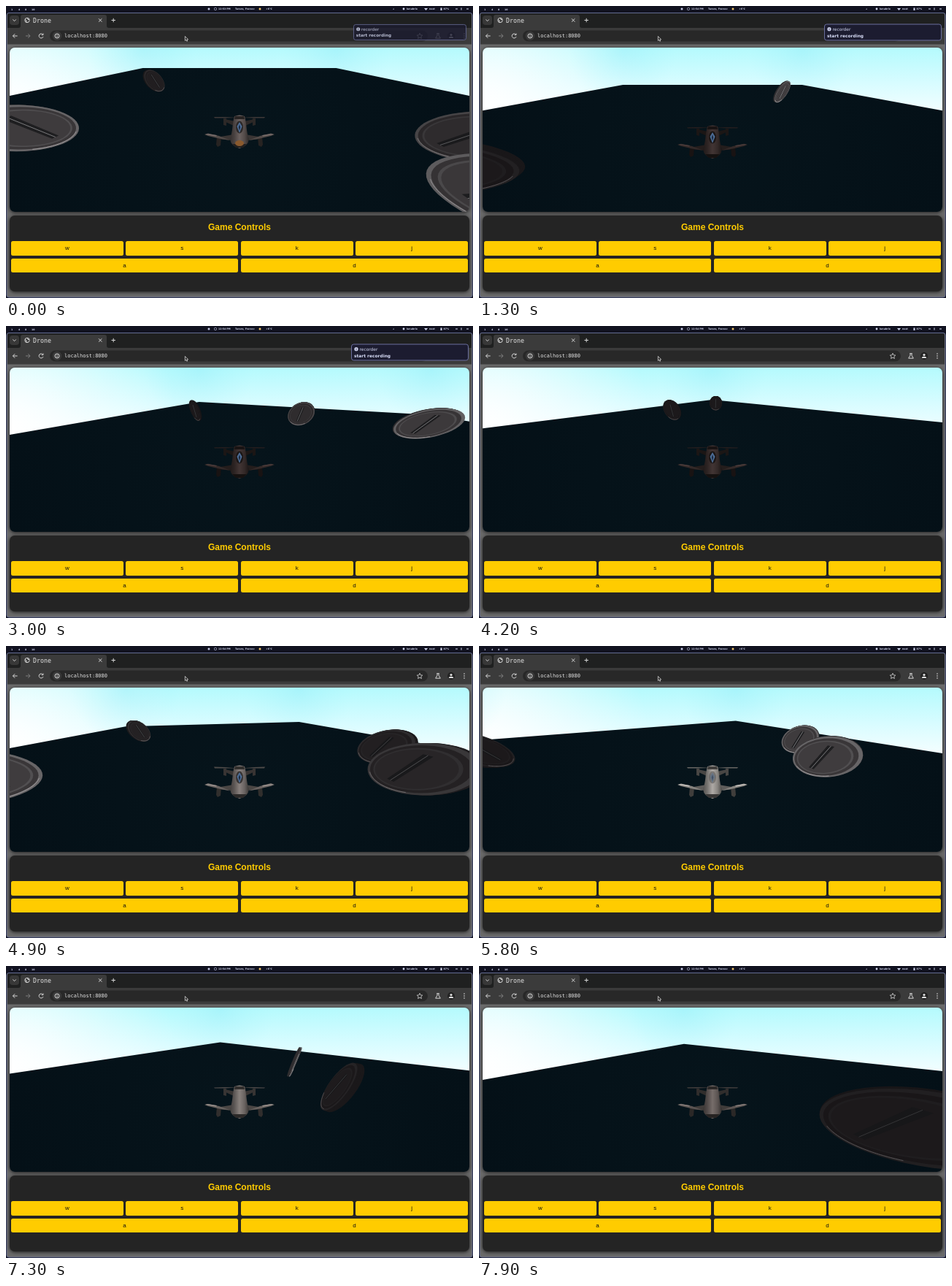
An HTML page with a canvas for the animation above (8000 ms loop, 640 by 400 pixels).

```html
<!DOCTYPE html>
<html lang="en">
<head>
<meta charset="utf-8">
<title>Drone</title>
<style>
  html, body { margin: 0; width: 100%; height: 100%; overflow: hidden; background: #111220; }
  #stage { position: absolute; left: 0; top: 0; width: 640px; height: 400px; overflow: hidden; }
  svg { position: absolute; left: 0; top: 0; }
  canvas, .panel { position: absolute; left: 5px; width: 630px; border-radius: 7px; box-shadow: 0 1px 5px #000b; }
  canvas { top: 57px; height: 225px; }
  .panel { top: 287px; height: 103.5px; background: #242424; }
  h1 { margin: 0; position: absolute; left: 0; right: 0; top: 9px; text-align: center; color: #fc0; font: bold 12px/15px "Liberation Sans", Arial, sans-serif; }
  .keys { position: absolute; left: 2px; right: 2px; top: 35.3px; display: grid; grid-template-columns: repeat(4, 1fr); gap: 3.9px; }
  .keys span { border-radius: 2.5px; background: #fc0; color: #111; text-align: center; font: 8px/19.5px "Liberation Sans", Arial, sans-serif; }
  .keys .wide { grid-column: span 2; }
  .mono { font-family: "DejaVu Sans Mono", monospace; fill: #e4e4e4; }
  .bar text { font: bold 3.2px "DejaVu Sans", sans-serif; fill: #d5daf2; }
  .line { fill: none; stroke: #d6d6d6; stroke-width: 1; }
  .note text { font: 5.9px "DejaVu Sans", sans-serif; fill: #d3d8f2; }
</style>
</head>
<body>
<div id="stage">
  <svg width="640" height="400" viewBox="0 0 640 400">
    <rect width="640" height="400" fill="#111220"/>
    <g class="bar">
      <text x="7" y="5.5">1</text><text x="17" y="5.5">4</text><text x="26" y="5.5">8</text><text x="35" y="5.5">10</text>
      <circle cx="278" cy="4" r="1.5" fill="#c5cae5"/>
      <circle cx="287" cy="4" r="1.7" fill="none" stroke="#c5cae5" stroke-width=".6"/>
      <text x="291" y="5.3" id="clock">12:53 PM</text>
      <text x="314" y="5.3">Tarare, France:</text>
      <circle cx="348" cy="4" r="1.5" fill="#efc46a"/>
      <text x="356" y="5.3">+6°C</text>
      <text x="530" y="5.3">◂</text><circle cx="545" cy="4" r="1.4" fill="#d5daf2"/>
      <text x="549" y="5.3">lunabrio</text>
      <path d="M573 3h5l-2.5 3z" fill="#d5daf2"/><text x="580" y="5.3">nest</text>
      <rect x="595.5" y="2.5" width="2" height="3.5" fill="#d5daf2"/><text x="599.5" y="5.3">87%</text>
      <path d="M616 4h3M624 2.5v3M631 4h3" stroke="#d5daf2"/>
    </g>
    <rect x="1" y="9.5" width="638" height="389.5" rx="3" fill="#6b6b6b" stroke="#626b91"/>
    <path d="M2 30V12q0-2 2-2h632q2 0 2 2v18z" fill="#1f2020"/>
    <rect x="2" y="30" width="636" height="22.5" fill="#3b3b3b"/>
    <path d="M17 30q3 0 3-3V15q0-3 3-3h112q3 0 3 3v12q0 3 3 3z" fill="#3b3b3b"/>
    <rect x="5" y="13" width="13" height="13" rx="4" fill="#383838"/>
    <g class="line">
      <path d="M9.3 18.5l2.2 2.2 2.2-2.2"/>
      <circle cx="29" cy="19.5" r="3.2"/><path d="M26 18.5l2 1.5v2.5M29.5 16.5l.5 2h2"/>
      <path d="M127 17.3l4.4 4.4M131.4 17.3l-4.4 4.4M144.5 19.5h5.4M147.2 16.8v5.4"/>
      <path d="M15.6 41H9.5M12.2 38.2L9.4 41l2.8 2.8"/>
      <path d="M27 41h6M30.3 38.2l2.8 2.8-2.8 2.8" stroke="#7d7d7d"/>
      <path d="M50.6 39.2A3 3 0 1 0 51 42M51 37.6v2h-2.2"/>
    </g>
    <rect x="60" y="33.5" width="518" height="15" rx="7.5" fill="#282828"/>
    <circle cx="70" cy="41" r="6.2" fill="#3a3a3a"/>
    <g class="line">
      <circle cx="70" cy="41" r="3"/><path d="M70 40.5v2.2M70 39v.7"/>
      <path d="M567 37.3l1.1 2.5 2.7.3-2 1.8.6 2.7-2.4-1.4-2.4 1.4.6-2.7-2-1.8 2.7-.3z" stroke-width=".8"/>
      <path d="M590.2 37.7h3.6M591 37.7v2.5l-2.3 4h6.6l-2.3-4v-2.5"/>
    </g>
    <g fill="#e0e0e0">
      <circle cx="610" cy="41" r="5" fill="#222"/><circle cx="610" cy="39.5" r="1.6"/><path d="M606.8 44q0-2.3 3.2-2.3t3.2 2.3z"/>
      <circle cx="628" cy="38" r=".8"/><circle cx="628" cy="41" r=".8"/><circle cx="628" cy="44" r=".8"/>
    </g>
    <text class="mono" x="37" y="22.8" font-size="8.3">Drone</text>
    <text class="mono" x="80" y="43.4" font-size="7">localhost:8080</text>
    <path d="M245.4 41.5v6l1.4-1.2 1 2 .9-.4-.9-2h1.8z" fill="#222" stroke="#eee" stroke-width=".7"/>
    <g class="note" id="note">
      <rect x="473.5" y="25" width="160" height="22" rx="3" fill="#1c1c30" stroke="#6a6f9e"/>
      <circle cx="480" cy="31.7" r="2.6" fill="#d3d8f2"/><path d="M480 31.2v2M480 29.8v.7" stroke="#1c1c30" stroke-width=".8"/>
      <text x="484.5" y="33.9">recorder</text>
      <text x="477" y="42.6" style="font-weight:bold">start recording</text>
    </g>
  </svg>
  <canvas id="view" width="630" height="225"></canvas>
  <div class="panel">
    <h1>Game Controls</h1>
    <div class="keys">
      <span>w</span><span>s</span><span>k</span><span>j</span>
      <span class="wide">a</span><span class="wide">d</span>
    </div>
  </div>
</div>
<script>
const LOOP = 8000, RAD = Math.PI / 180;
const F = 112, CX = 320, CY = 169.5;             // focal length and centre of view
const HALF = 6.8, R = .41, THICK = .03;          // floor and coin sizes, camera height = 1
const g = document.getElementById('view').getContext('2d');
const note = document.getElementById('note'), clock = document.getElementById('clock');
const mix = (a, b, k) => a + (b - a) * k;
const clamp = k => Math.max(0, Math.min(1, k));
const grey = (v, warm = 0) => `rgb(${v + warm},${v},${v + 2})`;

// Flight stops: time, x, z, heading
const stops = [
  [0, 0, .33, 180], [1300, 0, -.2, 360], [3000, -.11, .3, 430], [4200, -.2, 1.05, 498.6],
  [4900, .13, .8, 550], [6800, -.52, .08, 589.4], [7900, -1.5, -1.1, 600]
];
const coins = [
  { x: 2.88, z: 3.45 }, { x: 3.8, z: -.75 }, { x: 3.72, z: -3.72 },
  { x: -3.8, z: -.55, taken: 7350 }, { x: -2.8, z: .22 }
];

function poseAt(t) {
  const i = Math.max(1, stops.findIndex(s => s[0] > t));
  const b = t < stops.at(-1)[0] ? i : stops.length - 1, from = stops[b - 1], to = stops[b];
  const k = clamp((t - from[0]) / (to[0] - from[0]));
  const [, x, z, yaw] = from.map((v, j) => mix(v, to[j], k));
  const lift = 1 - clamp(t / 1200);
  const pitch = mix(36.9, 45, lift) * RAD;
  return {
    x, z, yaw, lift, drop: mix(.8, 1.04, lift),
    sy: Math.sin(yaw * RAD), cy: Math.cos(yaw * RAD), sp: Math.sin(pitch), cp: Math.cos(pitch)
  };
}

// Camera space: right, up, depth
function toCam(p, x, y, z) {
  const dx = x - p.x, dz = z - p.z, fwd = dx * p.sy + dz * p.cy;
  return [dx * p.cy - dz * p.sy, y * p.cp + fwd * p.sp, fwd * p.cp - y * p.sp];
}
const toScreen = ([r, u, d]) => [CX + F * r / d, CY - F * u / d];

function poly(pts, fill, stroke, width = 1) {
  g.beginPath();
  pts.forEach(q => g.lineTo(q[0], q[1]));
  if (fill) { g.closePath(); g.fillStyle = fill; g.fill(); }
  if (stroke) { g.strokeStyle = stroke; g.lineWidth = width; g.stroke(); }
}

function oval(x, y, rx, ry, fill) {
  g.beginPath();
  g.ellipse(x, y, rx, ry, 0, 0, 7);
  g.fillStyle = fill;
  g.fill();
}

function glow(x, y, r, from, to) {
  const shade = g.createRadialGradient(x, y, 2, x, y, r);
  shade.addColorStop(0, from);
  shade.addColorStop(1, to);
  return shade;
}

const floorCorners = p => [[-1, 1], [1, 1], [1, -1], [-1, -1]].map(([x, z]) => toCam(p, x * HALF, -1, z * HALF));

function drawSky(p) {
  const sky = g.createLinearGradient(0, 57, 0, 150);
  sky.addColorStop(0, '#b4fafd');
  sky.addColorStop(.5, '#d6fcff');
  sky.addColorStop(1, '#f6feff');
  g.fillStyle = sky;
  g.fillRect(5, 57, 630, 225);
  g.fillStyle = glow(5, 140, 230, '#fff', '#fff0');
  g.fillRect(5, 57, 300, 120);
  for (const c of floorCorners(p)) {
    if (c[2] < 1) continue;
    const [x] = toScreen(c);
    g.fillStyle = glow(x, 60, 75, '#8eeaf755', '#a4f2fa00');
    g.fillRect(x - 75, 57, 150, 80);
  }
}

function drawFloor(p) {
  const near = .05, corners = floorCorners(p), out = [];
  corners.forEach((a, i) => {
    const b = corners[(i + 1) % 4];
    if (a[2] > near) out.push(a);
    if ((a[2] > near) !== (b[2] > near)) {
      const k = (near - a[2]) / (b[2] - a[2]);
      out.push(a.map((v, j) => mix(v, b[j], k)));
    }
  });
  poly(out.map(toScreen), glow(320, 190, 330, '#06141b', '#041017'));
}

function drawCoin(p, c, t) {
  const spin = .1845 * t - 85, nx = Math.sin(spin * RAD), nz = Math.cos(spin * RAD);
  const dx = c.x - p.x, dz = c.z - p.z;
  const side = dx * nx + dz * nz > 0 ? -1 : 1;
  const at = (off, a, b) => toCam(p, c.x + nx * off * side + nz * a, b - p.drop, c.z + nz * off * side - nx * a);
  const ring = (off, r, from = 0, to = 360) => Array.from({ length: 49 }, (_, i) => {
    const a = mix(from, to, i / 48) * RAD;
    return at(off, r * Math.cos(a), r * Math.sin(a));
  });
  if (ring(-THICK, R).concat(ring(THICK, R)).some(q => q[2] < .1)) return;
  // Glint when the face mirrors the east or west sky
  const mirror = 2 * spin * RAD - Math.atan2(dx, dz);
  const l = .06 + .6 * Math.sin(mirror) ** 8 * clamp(1.5 * (Math.hypot(dx, dz) - 1.9));
  const show = (pts, ...style) => poly(pts.map(toScreen), ...style);
  for (let off = -THICK; off < THICK; off += THICK / 2) show(ring(off, R), grey(20 + 40 * l, 2));
  show(ring(THICK, R), grey(24 + 120 * l, 2));
  show(ring(THICK, R * .92), grey(19 + 55 * l, 3));
  show(ring(THICK, R * .82), grey(24 + 85 * l, 2));
  show(ring(THICK, R * .77), grey(21 + 60 * l, 3));
  const slot = [[-.04, -.25], [.04, -.25], [.04, .25], [-.04, .25]];
  show(slot.map(([a, b]) => at(THICK, a, b)), grey(22 + 12 * l));
  show([at(THICK, 0, -.25), at(THICK, 0, .25)], null, grey(46 + 120 * l));
  show(ring(THICK, R * .94, 235, 315), null, grey(75 + 130 * l, 4));
}

function drawDrone(p, t) {
  const lit = Math.max(0, Math.cos((p.yaw - 212) * RAD)) ** 6;
  const rgb = [mix(60, 160, lit), mix(48, 156, lit), mix(47, 152, lit)];
  const tone = k => `rgb(${rgb.map(v => v * k)})`;
  const flutter = .5 * Math.sin(t / 45);
  g.save();
  g.translate(320, 187 - 14 * p.lift);
  for (const s of [-1, 1]) {
    g.save();
    g.scale(s, 1);
    // far arm, motor and rotor
    poly([[6, -15], [20, -18], [21, -15], [8, -9]], tone(.45));
    poly([[18, -19], [22, -19], [22, -10], [18, -9]], tone(.45));
    poly([[3, -20 + flutter], [20, -21], [35, -21 - flutter], [34, -19.5], [20, -19.5]], tone(.65));
    // near arm, motor and rotor
    poly([[8, 3], [26, 6], [30, 9], [10, 11]], tone(.6));
    poly([[25, 6], [31, 6], [32, 17], [30, 20], [26, 18]], tone(.4));
    poly([[13, 11 + flutter], [28, 5], [43, 1.5 - flutter], [48, 3], [43, 5], [28, 8.5]], tone(.85));
    poly([[31, 4], [44, 2], [47, 3], [32, 5.5]], tone(1.25));
    g.restore();
  }
  const hull = g.createLinearGradient(-14, 0, 14, 0);
  [.5, .75, 1.1, .85, .4].forEach((k, i) => hull.addColorStop(i / 4, tone(k)));
  g.beginPath();
  g.moveTo(-7, -22);
  g.quadraticCurveTo(0, -25, 7, -22);
  g.bezierCurveTo(10, -12, 9, -1, 13, 9);
  g.quadraticCurveTo(12, 19, 0, 22);
  g.quadraticCurveTo(-12, 19, -13, 9);
  g.bezierCurveTo(-9, -1, -10, -12, -7, -22);
  g.fillStyle = hull;
  g.fill();
  poly([[-6, -22], [6, -22], [7, -18], [-7, -18]], tone(.4));
  poly([[-10, 16], [10, 16], [5, 21], [-5, 21]], tone(.35));
  g.globalAlpha = 1 - clamp((t - 5000) / 1500);
  oval(0, -7, 5, 8.5, tone(.45));
  poly([[0, -14], [3.5, -8], [0, 1], [-3.5, -8]], '#4e6f99');
  poly([[0, -11], [1.3, -7], [0, -2], [-1.3, -7]], '#1d2b40');
  g.globalAlpha = p.lift;
  oval(0, 15, 6, 4, '#8a5a2e');
  g.restore();
}

function drawChrome(t) {
  const grow = 1 - (1 - clamp(t / 300)) ** 3, fade = 1 - clamp((t - 3700) / 250);
  const scale = mix(.963, 1, Math.min(grow, fade));
  note.setAttribute('transform', `translate(553.5 36) scale(${scale}) translate(-553.5 -36)`);
  note.setAttribute('opacity', mix(.8, 1, grow) * fade);
  clock.textContent = t < 500 ? '12:53 PM' : '12:54 PM';
}

function draw(now) {
  const t = now % LOOP, p = poseAt(t);
  const range = c => Math.hypot(c.x - p.x, c.z - p.z);
  g.setTransform(1, 0, 0, 1, -5, -57);
  drawSky(p);
  drawFloor(p);
  coins.filter(c => !(t > c.taken))
    .sort((a, b) => range(b) - range(a))
    .forEach(c => drawCoin(p, c, t));
  drawDrone(p, t);
  drawChrome(t);
}

let start;
function tick(now) {
  start ??= now;
  draw(now - start);
  requestAnimationFrame(tick);
}
draw(0);
requestAnimationFrame(tick);
</script>
</body>
</html>
```
